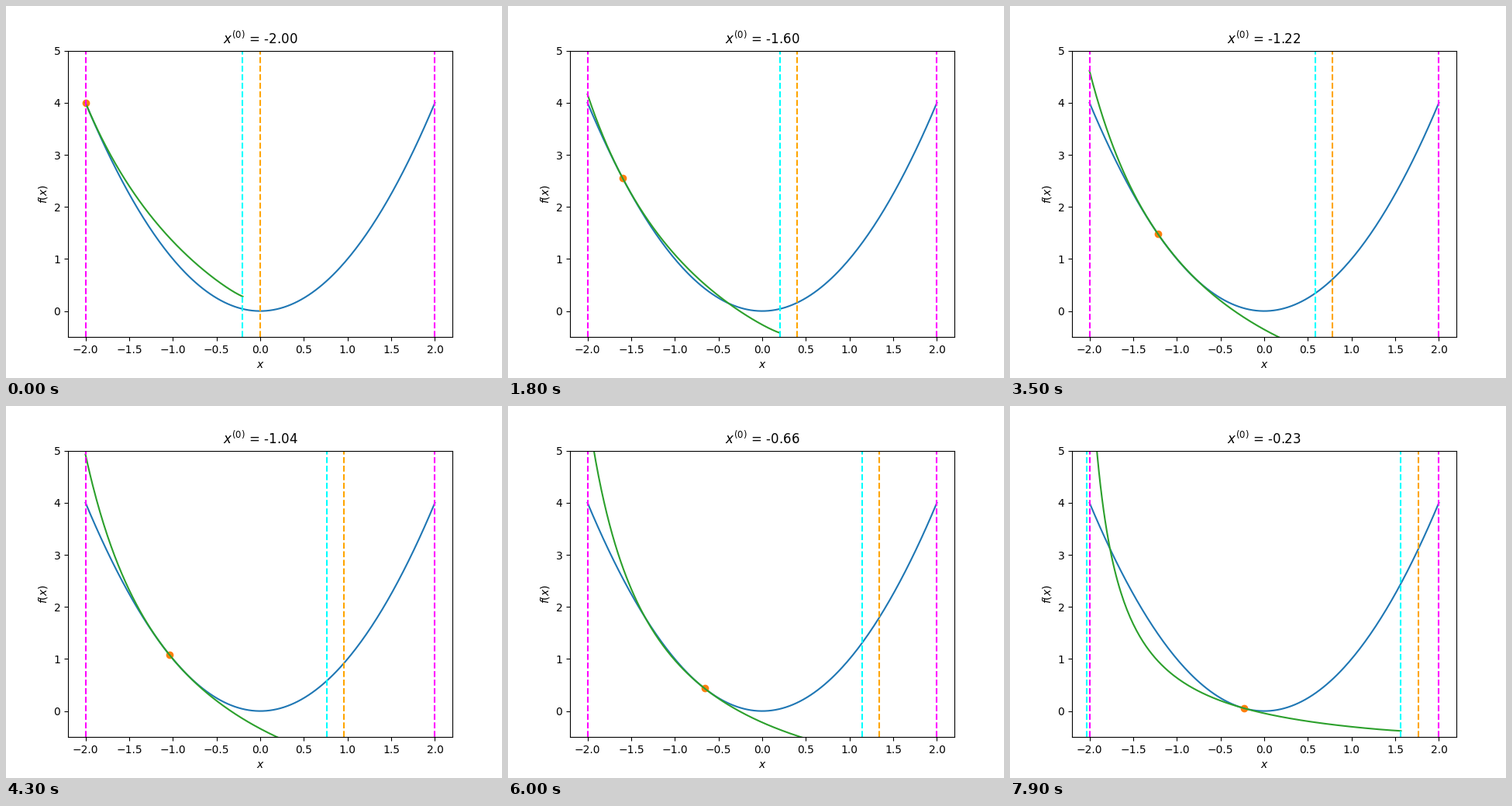
These frames come from a looping animation (640x480 px, 8000 ms). A matplotlib script:

```python
"""Convex separable approximation of f(x) = x^2 with moving asymptotes."""
import numpy as np
import matplotlib.pyplot as plt
from matplotlib.animation import FuncAnimation

FRAMES, INTERVAL = 80, 100
X_MIN, X_MAX = -2.0, 2.0
SPAN = 2.0      # distance from the expansion point to each asymptote
MARGIN = 0.1    # share of that distance kept clear by the move limits
STARTS = np.linspace(X_MIN, X_MAX, 180)


def f(x):
    return x**2


def df(x):
    return 2 * x


def approximation(x, x0):
    """Rational model that matches f and its slope at x0."""
    low, upp = x0 - SPAN, x0 + SPAN
    rise, fall = max(df(x0), 0), max(-df(x0), 0)
    eps = 1e-5 / (X_MAX - X_MIN)
    p = SPAN**2 * (1.001 * rise + 0.001 * fall + eps)
    q = SPAN**2 * (0.001 * rise + 1.001 * fall + eps)
    return f(x0) + p / (upp - x) + q / (x - low) - (p + q) / SPAN


fig, ax = plt.subplots(figsize=(6.4, 4.8), dpi=100)
ax.set(xlim=(-2.2, 2.2), ylim=(-0.5, 5), xlabel="$x$", ylabel="$f(x)$")

xs = np.linspace(X_MIN, X_MAX, 200)
ax.plot(xs, f(xs), color="C0")
point, = ax.plot([], [], "o", color="C1")
model, = ax.plot([], [], color="C2")


def vline(x, color):
    return ax.axvline(x, color=color, linestyle="--")


for bound in (X_MIN, X_MAX):
    vline(bound, "magenta")
asymptotes = [vline(0, "orange") for _ in range(2)]
limits = [vline(0, "cyan") for _ in range(2)]
title = ax.set_title("")


def update(i):
    x0 = STARTS[i]
    reach = (1 - MARGIN) * SPAN
    for side, asymptote, limit in zip((-1, 1), asymptotes, limits):
        asymptote.set_xdata([x0 + side * SPAN] * 2)
        limit.set_xdata([x0 + side * reach] * 2)
    x = np.linspace(max(X_MIN, x0 - reach), min(X_MAX, x0 + reach), 200)
    model.set_data(x, approximation(x, x0))
    point.set_data([x0], [f(x0)])
    title.set_text(f"$x^{{(0)}}$ = {x0:.2f}")
    return point, model, title, *asymptotes, *limits


anim = FuncAnimation(fig, update, frames=FRAMES, interval=INTERVAL,
                     repeat=True, repeat_delay=0, blit=False)
plt.show()
```
